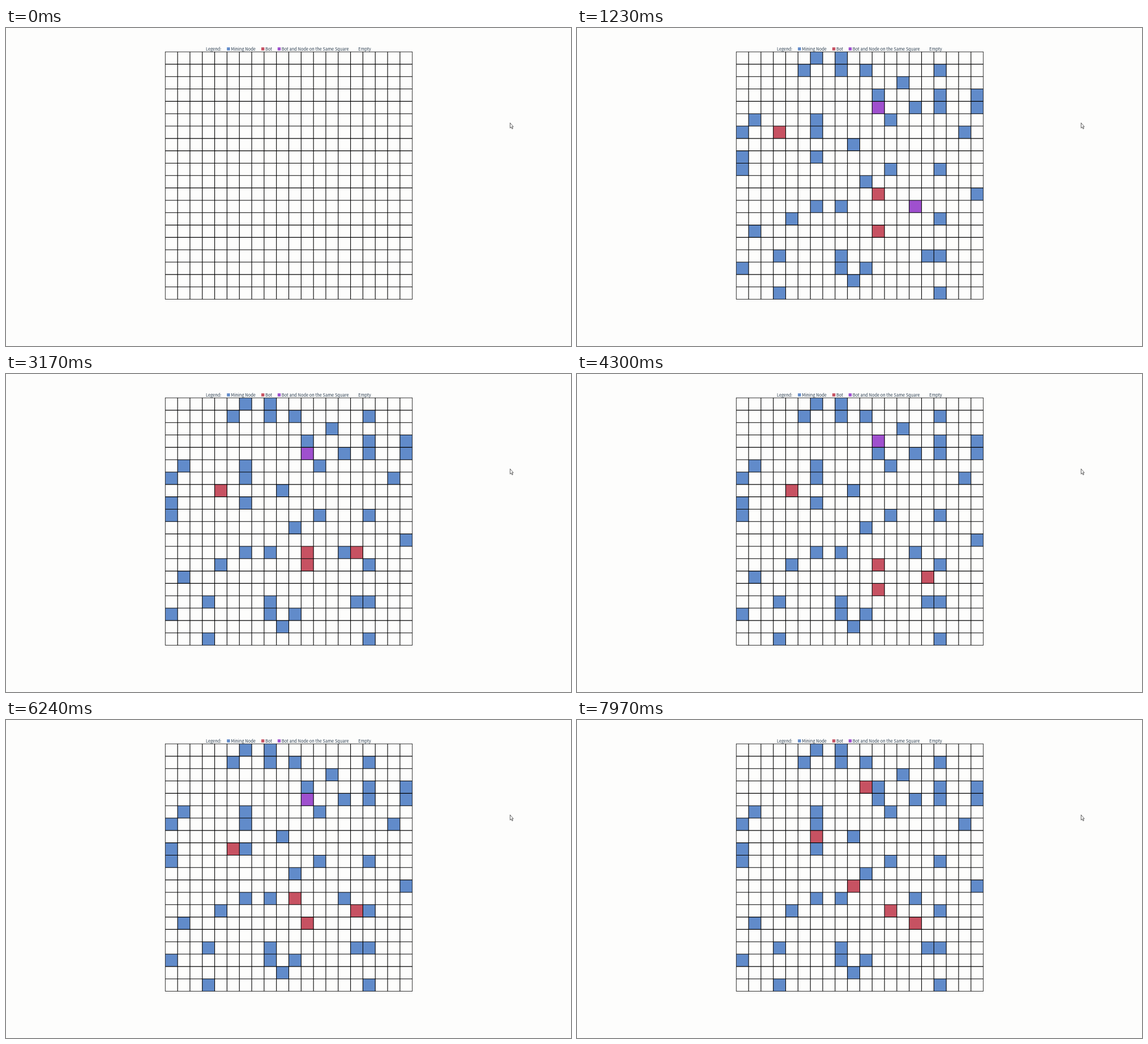
Recreate the animation shown at these times as an HTML page. Size 998x561 px, loop 8000 ms.

```html
<!DOCTYPE html>
<html lang="en">
<head>
<meta charset="utf-8">
<title>Mining grid</title>
<style>
  html, body { margin: 0; width: 100%; height: 100%; overflow: hidden; background: #fdfdfc; }
  svg { display: block; }
  text { font: 7.45px "Noto Sans CJK SC", "Noto Sans CJK JP", "Noto Sans CJK", "Open Sans", sans-serif; fill: #2c3e50; }
</style>
</head>
<body>
<svg width="998" height="561" viewBox="0 0 998 561">
  <g id="legend"></g>
  <g id="cells"></g>
  <path id="lines" fill="none" stroke="#000" stroke-width="1.1"/>
  <rect id="border" fill="none" stroke="#000" stroke-width=".8"/>
  <path d="M890.4 167.3v9.2l2-1.8 1.5 3.3 1.4-.6-1.5-3.2h2.4z" fill="#fff" stroke="#222" stroke-width=".7"/>
</svg>
<script>
const LOOP = 8000, LOADED = 205, FIRST_MOVE = 2205, TICK = 1000;
const SIZE = 20, PITCH = 21.82, LEFT = 281.3, TOP = 42.1;
const BLUE = '#618bca', RED = '#c75262', PURPLE = '#9f50ce';

// Columns holding a mining node, row by row
const nodeRows = [
  [6, 8], [5, 8, 10, 16], [13], [11, 16, 19], [11, 14, 16, 19],
  [1, 6, 12], [0, 6, 18], [9], [0, 6], [0, 12, 16],
  [10], [19], [6, 8, 14], [4, 16], [1],
  [], [3, 8, 15, 16], [0, 8, 10], [9], [3, 16]
];

// Each bot takes one compass step per tick; "-" means it waits
const bots = [
  { col: 3, row: 6, walk: 'SE - - E S NE' },
  { col: 11, row: 4, walk: '- - N - S NW' },
  { col: 14, row: 12, walk: 'E S S - N SW' },
  { col: 11, row: 11, walk: 'S - S N W NW' },
  { col: 11, row: 14, walk: 'N S S N - NE' }
];

const byId = id => document.getElementById(id);
const rect = (x, y, size, fill) =>
  `<rect x="${x}" y="${y}" width="${size}" height="${size}" fill="${fill}"/>`;
const cell = (col, row, fill) => rect(LEFT + col * PITCH, TOP + row * PITCH, PITCH, fill);
const label = (x, text) => `<text x="${x}" y="39.6">${text}</text>`;
const swatch = (x, fill, text) => rect(x, 34.2, 5.4, fill) + label(x + 7, text);

byId('legend').innerHTML =
  label(353, 'Legend:') +
  swatch(390.2, BLUE, 'Mining Node') +
  swatch(451, RED, 'Bot') +
  swatch(479.8, PURPLE, 'Bot and Node on the Same Square') +
  label(622.3, 'Empty');

const extent = SIZE * PITCH;
let path = '';
for (let i = 1; i < SIZE; i++) {
  path += `M${LEFT + i * PITCH} ${TOP}v${extent}M${LEFT} ${TOP + i * PITCH}h${extent}`;
}
byId('lines').setAttribute('d', path);
Object.entries({ x: LEFT, y: TOP, width: extent, height: extent })
  .forEach(([name, value]) => byId('border').setAttribute(name, value));

const nodeCells = nodeRows.map((cols, row) => cols.map(col => cell(col, row, BLUE)).join('')).join('');

function botCell({ col, row, walk }, moves) {
  for (const step of walk.split(' ').slice(0, moves)) {
    col += step.includes('E') - step.includes('W');
    row += step.includes('S') - step.includes('N');
  }
  return cell(col, row, nodeRows[row].includes(col) ? PURPLE : RED);
}

let shown;

function draw(now) {
  const time = now % LOOP;
  const moves = time < LOADED ? -1 : Math.max(0, Math.floor((time - FIRST_MOVE) / TICK) + 1);
  if (moves !== shown) {
    shown = moves;
    byId('cells').innerHTML = moves < 0
      ? ''
      : nodeCells + bots.map(bot => botCell(bot, moves)).join('');
  }
  requestAnimationFrame(draw);
}
draw(performance.now());
</script>
</body>
</html>
```
